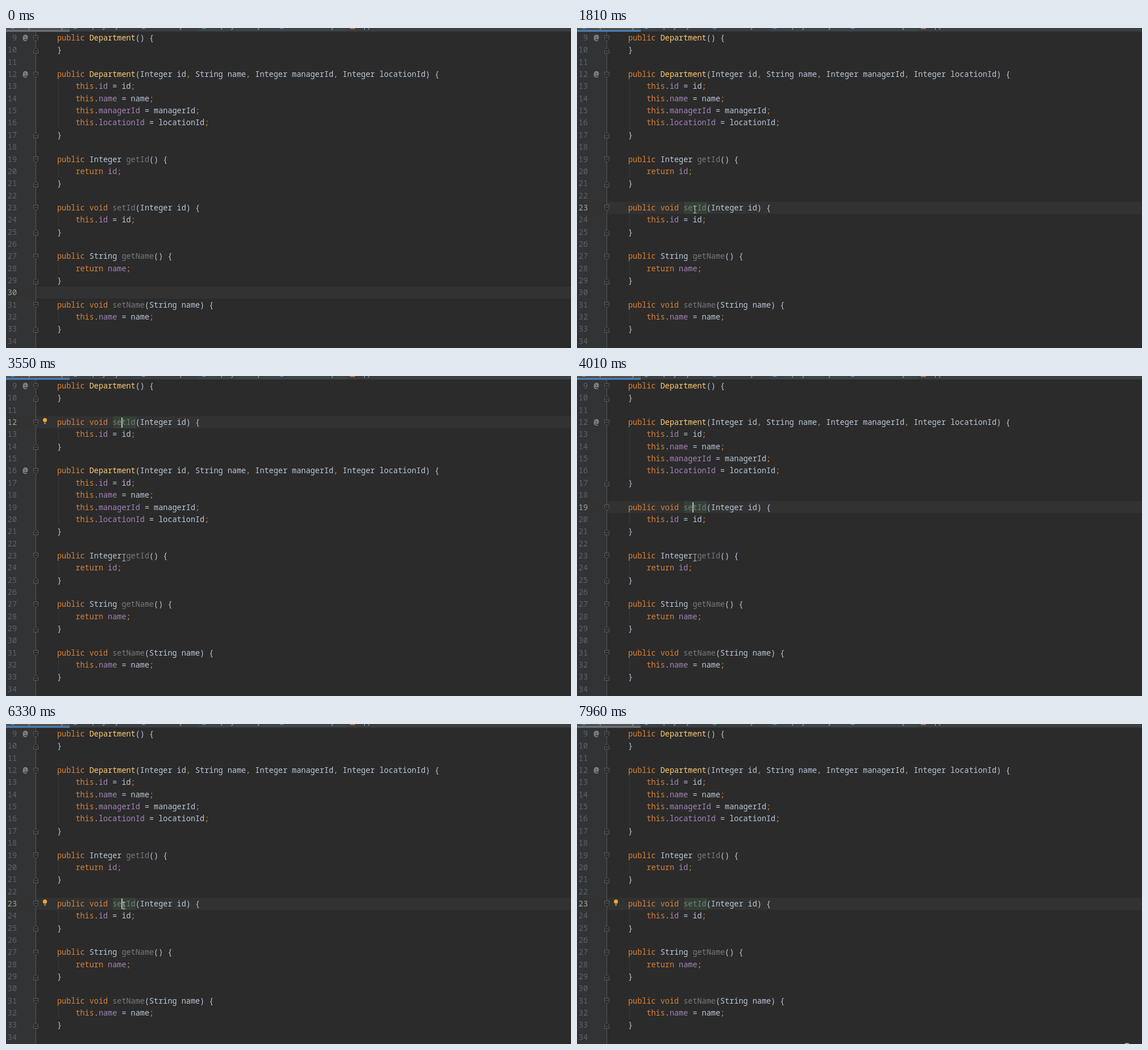
Write an HTML page with a canvas that moves like this. It is 994 px wide and 563 px high and loops after 8.03 s.

```html
<!DOCTYPE html>
<html lang="en">
<head>
<meta charset="utf-8">
<title>Moving a method</title>
<style>
  html, body { margin: 0; width: 100%; height: 100%; overflow: hidden; background: #2b2b2b; }
  canvas { display: block; width: 994px; height: 563px; }
</style>
</head>
<body>
<canvas id="stage" width="994" height="563"></canvas>
<script>
const ctx = document.getElementById('stage').getContext('2d');
const LOOP = 8030, LEFT = 90, CHAR = 8.1, ROW = 21.35, FIRST = 9;
const MONO = '13.5px "Noto Sans Mono", monospace';
const TABS = [
  [12, 'Department.java'], [122, 'Employee.java'], [242, 'Location.java'],
  [348, 'EmployeeDao.java'], [485, 'LocationDao.java'], [610, 'App.xml']
];

const method = (head, ...body) => [`public ${head} {`, ...body.map(s => '    ' + s), '}', ''];
const blocks = {
  E: method('Department()'),
  C: method('Department(Integer id, String name, Integer managerId, Integer locationId)',
    ...['id', 'name', 'managerId', 'locationId'].map(f => `this.${f} = ${f};`)),
  g: method('Integer getId()', 'return id;'),
  s: method('void setId(Integer id)', 'this.id = id;'),
  n: method('String getName()', 'return name;'),
  N: method('void setName(String name)', 'this.name = name;')
};

// Order of the movable methods from each time on
const moves = [
  [0, 'Cgsn'], [2750, 'Csgn'], [2950, 'sCgn'], [3880, 'Csgn'],
  [4470, 'Cgsn'], [5130, 'Cgns'], [5540, 'Cgsn']
];
const caretOn = [[1350, 1810], [2340, 6900], [7430, 7960]];
const usageOn = [[1410, 2750], [3020, 3880], [4010, LOOP]];
const bulbOn = [[3550, 3880], [6330, LOOP]];

const within = (t, spans) => spans.some(([a, b]) => t >= a && t < b);
const clamp = x => Math.max(0, Math.min(1, x));
const ease = x => x * x * (3 - 2 * x);
const centre = line => 17.5 + (line - FIRST) * ROW;

function rect(color, x, y, w, h) {
  ctx.fillStyle = color;
  ctx.fillRect(x, y, w, h);
}

function disc(color, x, y, r) {
  ctx.fillStyle = color;
  ctx.beginPath();
  ctx.arc(x, y, r, 0, 7);
  ctx.fill();
}

function text(str, x, y, color, align = 'left') {
  ctx.fillStyle = color;
  ctx.textAlign = align;
  ctx.fillText(str, x, y);
}

function tokenColor(word, before) {
  if (/^(public|void|return|this|[,;])$/.test(word)) return '#da8237';
  if (word === 'Department') return '#ffcb72';
  if (/^[gs]et[A-Z]/.test(word)) return '#787980';
  if (/(this\.|return )$/.test(before)) return '#a683ba';
  return '#bac8da';
}

function codeLine(str, y) {
  ctx.font = '500 ' + MONO;
  for (const m of str.matchAll(/\w+|[^\w\s]/g))
    text(m[0], LEFT + m.index * CHAR, y, tokenColor(m[0], str.slice(0, m.index)));
}

// Fold marker: dir 1 points down, -1 points up
function fold(y, dir) {
  ctx.save();
  ctx.translate(52.5, Math.round(y) + 0.5);
  ctx.scale(1, dir);
  ctx.beginPath();
  ctx.moveTo(-4, -5);
  ctx.lineTo(4, -5);
  ctx.lineTo(4, 1);
  ctx.lineTo(0, 5);
  ctx.lineTo(-4, 1);
  ctx.closePath();
  ctx.fillStyle = '#2b2b2b';
  ctx.fill();
  ctx.moveTo(-2, -1);
  ctx.lineTo(2, -1);
  ctx.strokeStyle = '#5a5d5f';
  ctx.lineWidth = 1;
  ctx.stroke();
  ctx.restore();
}

function tabBar(focused) {
  rect('#3c3f41', 0, 0, 994, 6);
  rect('#3b4547', 338, 0, 262, 6);
  rect('#4e5254', 0, 0, 112, 4);
  rect(focused ? '#4a88c7' : '#747a80', 0, 4, 112, 2.5);
  ctx.font = '12.5px "Open Sans", sans-serif';
  TABS.forEach(([x, name], i) => {
    if (i < 5) disc('#3f88ad', x, -3, 5);
    else rect('#b9653d', x - 5, -4, 9, 6);
    text(name, x + 11, -0.5, '#a9b0b5');
  });
}

function bulb(y) {
  rect('#8c9094', 67, y + 0.5, 3, 2.5);
  disc('#f0a732', 68.5, y - 4, 3.6);
}

function beam(x, y) {
  ctx.strokeStyle = '#b8b8b8';
  ctx.lineWidth = 1;
  ctx.beginPath();
  ctx.moveTo(x - 3, y - 6);
  ctx.lineTo(x + 3, y - 6);
  ctx.moveTo(x, y - 6);
  ctx.lineTo(x, y + 6);
  ctx.moveTo(x - 3, y + 6);
  ctx.lineTo(x + 3, y + 6);
  ctx.stroke();
}

function pointer(t) {
  if (t < 70 || t >= 7170) return;
  const glide = (from, to, a, b) => {
    const k = ease(clamp((t - a) / (b - a)));
    return from.map((v, i) => v + (to[i] - v) * k);
  };
  const rest = [207.5, 319.5];
  const [x, y] = t < 900 ? glide([946.5, 562], [199.5, 322.5], 70, 870)
    : t < 6330 ? glide([199.5, 322.5], rest, 900, 1150)
    : glide(rest, [918, 553], 6330, 7100);
  if (t >= 1210 && t < 1410) disc('rgba(200,190,0,.75)', x - 1.5, y - 1, 9.3);
  beam(x, y);
}

function draw(t) {
  const order = 'E' + moves.filter(m => m[0] <= t).pop()[1] + 'N';
  const clicked = t >= 1350;
  let line = FIRST, setLine;
  for (const key of order) {
    if (key === 's') setLine = line;
    line += blocks[key].length;
  }
  const current = clicked ? setLine : 30;
  const setY = centre(setLine);

  rect('#2b2b2b', 0, 0, 994, 563);
  rect('#313335', 0, 0, 53, 563);
  rect('#323232', 0, Math.round(centre(current) - ROW / 2), 994, 21);
  rect('#555555', 52, 6, 1, 557);
  if (within(t, usageOn))
    rect('#344134', LEFT + 12 * CHAR + 1, Math.round(setY - ROW / 2), 5 * CHAR, 21);

  line = FIRST;
  for (const key of order) {
    const code = blocks[key];
    const last = line + code.length - 2;
    if (last > line + 1)
      rect('#393939', 92, centre(line + 0.5), 1, (last - line - 1) * ROW);
    code.forEach((str, i) => {
      const base = Math.round(centre(line + i) + 4.5);
      codeLine(str, base);
      ctx.font = MONO;
      text(line + i, 19, base, line + i === current ? '#a4a3a3' : '#606366', 'right');
    });
    if (key === 'E' || key === 'C') {
      ctx.font = '15px "Noto Sans Mono", monospace';
      text('@', 34, Math.round(centre(line) + 4), '#b4b6b8', 'center');
    }
    fold(centre(line), 1);
    fold(centre(last), -1);
    line += code.length;
  }

  if (within(t, bulbOn)) bulb(setY);
  if (within(t, caretOn)) rect('#bbbbbb', 203, Math.round(setY - 9), 2, 18);
  tabBar(clicked && t < 7960);
  pointer(t);
  if (t >= 7890) disc('#a5a5a5', 967.5, 568, 7);
}

function tick(now) {
  draw(now % LOOP);
  requestAnimationFrame(tick);
}
requestAnimationFrame(tick);
</script>
</body>
</html>
```
